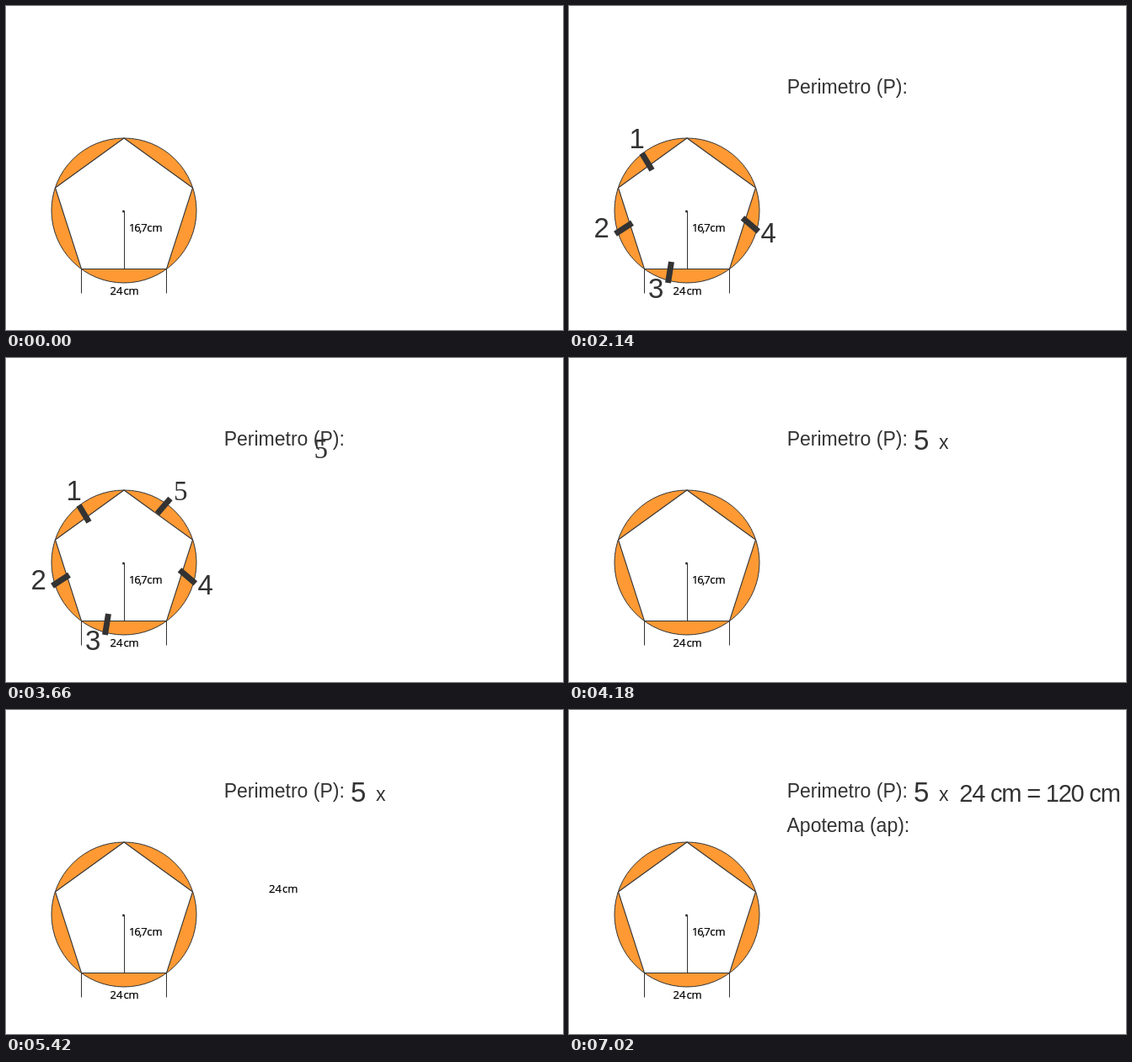
These frames come from a looping animation (661x385 px, 8 s). An HTML page:

```html
<!DOCTYPE html>
<html lang="es">
<head>
<meta charset="utf-8">
<title>Perimetro</title>
<style>
  html, body { margin: 0; width: 100%; height: 100%; overflow: hidden; background: #fff; }
  svg { display: block; width: 661px; height: 385px; }
  text { font-family: "Liberation Sans", Arial, sans-serif; fill: #333; white-space: pre; }
  .title { font-size: 23px; }
  .digit { font-size: 33px; }
  .serif { font-family: "Liberation Serif", "Times New Roman", serif; }
  .result { font-size: 29px; letter-spacing: -1.2px; }
  .label { font: 13px "Open Sans", sans-serif; fill: #000; stroke: #000; stroke-width: .25; }
  .tight { letter-spacing: -1.3px; }
  .thin { stroke: #333; stroke-width: 1; }
  .tick { stroke: #333; stroke-width: 7; }
</style>
</head>
<body>
<svg viewBox="0 0 661 385">
  <circle cx="140" cy="243" r="86" fill="#f93" stroke="#333"/>
  <path d="M140 157L221.5 216L190.5 312.5H89.5L58.5 216Z" fill="#fff" stroke="#333" stroke-width="1.1"/>
  <path class="thin" d="M140.5 244V312M89.5 312V341.5M190.5 312V341.5"/>
  <circle cx="139.5" cy="244" r="1.5" fill="#333"/>
  <text class="label" x="146" y="268"><tspan class="tight">16,7</tspan><tspan dx="1">cm</tspan></text>
  <text class="label" x="123.5" y="343">24<tspan dx="1">cm</tspan></text>

  <text class="title" x="258.7" y="104" data-from="500">Perimetro (P):</text>
  <g data-from="500" data-to="3820">
    <path class="tick" d="M86.5 175L98.5 195"/>
    <text class="digit" x="71.5" y="168.5">1</text>
  </g>
  <g data-from="1060" data-to="3820">
    <path class="tick" d="M55 270.7L75 257.8"/>
    <text class="digit" x="29.5" y="274.5">2</text>
  </g>
  <g data-from="1620" data-to="3820">
    <path class="tick" d="M121.5 304L117.5 329"/>
    <text class="digit" x="94" y="346.5">3</text>
  </g>
  <g data-from="2140" data-to="3820">
    <path class="tick" d="M206 251.8L224.8 267.8"/>
    <text class="digit" x="227.5" y="280.5">4</text>
  </g>
  <g data-from="2580" data-to="3820">
    <path class="tick" d="M179.5 185L195 167"/>
    <text class="digit serif" x="199" y="168.5">5</text>
  </g>

  <text class="digit serif" x="199" y="168.5" data-from="3060" data-to="3820" data-move="208 -62">5</text>
  <text class="digit" x="409" y="109" data-from="3820">5</text>
  <text class="title" x="439" y="108" data-from="4180">x</text>
  <text class="label" x="123.5" y="343" data-from="5020" data-to="5820" data-move="360 -241">24<tspan dx="1">cm</tspan></text>
  <text class="result" x="463.3" y="109" data-from="5820">24 cm = 120 cm</text>
  <text class="title" x="258.5" y="144.5" data-from="7020">Apotema (ap):</text>
</svg>
<script>
  const LOOP = 8000, STEP = 40;

  const parts = [...document.querySelectorAll("[data-from]")].map(el => ({
    el,
    from: +el.dataset.from,
    to: +(el.dataset.to || LOOP),
    move: el.dataset.move && el.dataset.move.split(" ").map(Number)
  }));

  function draw(t) {
    for (const { el, from, to, move } of parts) {
      el.style.display = t >= from && t < to ? "" : "none";
      if (!move) continue;
      // The first visible step is already one step along the path.
      const step = Math.floor((t - from) / STEP) + 1;
      const progress = step / ((to - from) / STEP + 1);
      el.setAttribute("transform", `translate(${move[0] * progress} ${move[1] * progress})`);
    }
  }

  const start = performance.now();
  function tick() {
    draw((performance.now() - start) % LOOP);
    requestAnimationFrame(tick);
  }
  tick();
</script>
</body>
</html>
```
